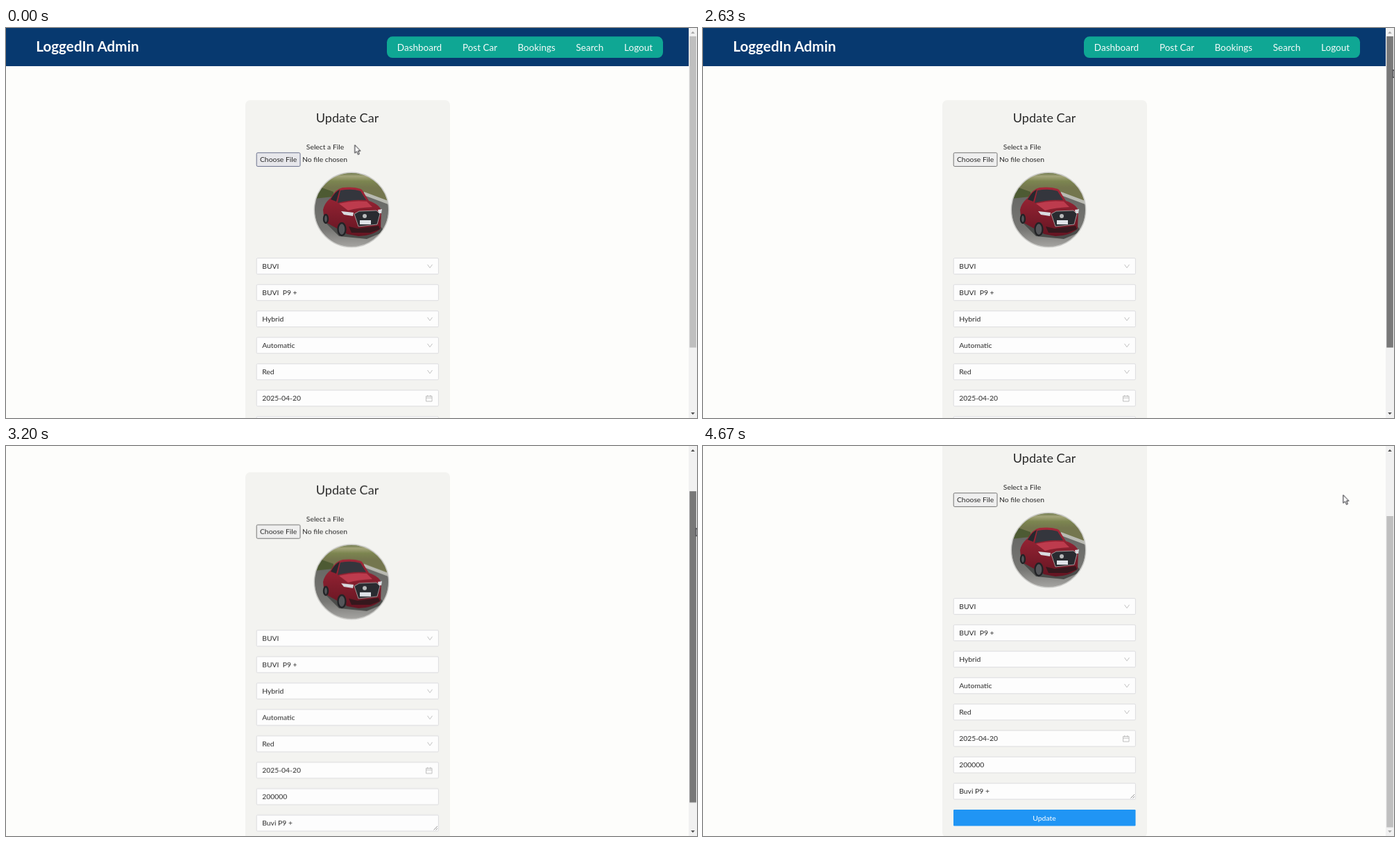
These frames come from a looping animation (996 by 562 pixels, 4700 ms). An HTML page:

```html
<!DOCTYPE html>
<html lang="en">
<head>
<meta charset="utf-8">
<title>Update Car</title>
<style>
html, body { margin: 0; width: 100%; height: 100%; overflow: hidden; background: #fdfdfb; }
svg { display: block; width: 100%; height: 100%; }
text { font: 10.37px Lato, sans-serif; fill: #2a2a2a; white-space: pre; }
.brand { font-size: 20.7px; font-weight: 700; fill: #fbfcfc; }
.nav { font-size: 13.5px; fill: #f4fbfa; text-anchor: middle; }
.mid { text-anchor: middle; }
.title { font-size: 18.1px; text-anchor: middle; }
.box { fill: #fdfdfd; stroke: #d8d8dc; stroke-width: .9; }
.icon { fill: none; stroke: #b9b9b9; stroke-width: .9; }

#page, #thumb, #cursor { animation: 4.7s linear infinite; }
#page { animation-name: scroll; }
#thumb { animation-name: drag; }
#cursor { animation-name: point; }
#grip, #pick, #up, #down { animation: 4.7s step-end infinite; }
#grip { animation-name: press; }
#pick { animation-name: blur; }
#up { animation-name: enable; }
#down { animation-name: disable; }

@keyframes scroll {
  0%, 58.09% { transform: translateY(0); }
  61.06% { transform: translateY(-4.4px); }
  65.32% { transform: translateY(-22px); }
  68.09% { transform: translateY(-66px); }
  70.85% { transform: translateY(-106px); }
  73.4%, 100% { transform: translateY(-112px); }
}
@keyframes drag {
  0%, 58.09% { transform: translateY(0); }
  61.06% { transform: translateY(3.6px); }
  65.32% { transform: translateY(17.8px); }
  68.09% { transform: translateY(53px); }
  70.85% { transform: translateY(85px); }
  73.4%, 100% { transform: translateY(89px); }
}
@keyframes point {
  0%, .6% { transform: translate(502.7px, 168.5px); animation-timing-function: ease-in-out; }
  11.28%, 24.04% { transform: translate(744.7px, 206.5px); animation-timing-function: ease-in-out; }
  34.04% { transform: translate(991px, 63px); }
  45.32%, 58.09% { transform: translate(994.7px, 60px); }
  61.06% { transform: translate(994.7px, 64px); }
  65.32% { transform: translate(994.7px, 82px); }
  68.09% { transform: translate(994.7px, 118px); }
  70.85% { transform: translate(994.7px, 153px); }
  73.4%, 80.85% { transform: translate(994.7px, 158px); animation-timing-function: ease-in-out; }
  91.49% { transform: translate(920px, 61.5px); }
  92.98%, 96.6% { transform: translate(919.5px, 61.5px); }
  99.36%, 100% { transform: translate(922.7px, 70.5px); }
}
@keyframes press {
  0% { fill: #bfbfbf; }
  32.6% { fill: #a6a6a6; }
  52.13% { fill: #787878; }
  82.34% { fill: #a6a6a6; }
  84.26% { fill: #bfbfbf; }
}
@keyframes blur {
  0% { fill: #e7e7eb; stroke: #686f8c; }
  52.13% { fill: #efefef; stroke: #747474; }
}
@keyframes enable { 0% { fill: #a8a8a8; } 58.6% { fill: #505050; } }
@keyframes disable { 0% { fill: #505050; } 73.4% { fill: #a8a8a8; } }
</style>
</head>
<body>
<svg viewBox="0 0 996 562">
  <defs>
    <clipPath id="round"><circle cx="498" cy="262" r="53.5"/></clipPath>
    <linearGradient id="land" x2="0" y2="1">
      <stop offset="0" stop-color="#59683a"/>
      <stop offset=".12" stop-color="#a3a479"/>
      <stop offset=".25" stop-color="#7c8550"/>
      <stop offset=".42" stop-color="#74764e"/>
    </linearGradient>
    <linearGradient id="road" x2="0" y2="1">
      <stop offset="0" stop-color="#666764"/>
      <stop offset=".65" stop-color="#777774"/>
      <stop offset="1" stop-color="#aaa9a6"/>
    </linearGradient>
    <linearGradient id="paint" x2="0" y2="1">
      <stop offset="0" stop-color="#a32738"/>
      <stop offset="1" stop-color="#641522"/>
    </linearGradient>
  </defs>

  <g id="page">
    <rect width="984" height="55" fill="#07396f"/>
    <text class="brand" x="43.2" y="33.6">LoggedIn Admin</text>
    <rect x="549" y="12.3" width="398" height="30.7" rx="8" fill="#0fa794"/>
    <g id="menu"></g>

    <rect x="345" y="104" width="295" height="572" rx="7" fill="#f3f3f0"/>
    <text class="title" x="492" y="136">Update Car</text>
    <text class="mid" x="460" y="174.8">Select a File</text>
    <rect id="pick" x="361.2" y="179.8" width="62.8" height="19.6" rx="1.6"/>
    <text class="mid" x="392.6" y="193.2">Choose File</text>
    <text x="427" y="193.2">No file chosen</text>

    <g clip-path="url(#round)">
      <path fill="url(#land)" d="M443 207H553V262H443Z"/>
      <path fill="#4d5a33" d="M443 226L472 236V258H443Z"/>
      <path fill="url(#road)" d="M443 246L520 238L553 254V318H443Z"/>
      <path fill="#b9bab2" d="M516 236L553 250V255L516 241Z"/>
      <path fill="#4b4c4a" d="M459 279L480 300L520 304L546 293L538 284Z"/>
      <path fill="url(#paint)" d="M457 262Q459 252 468 245Q475 232 485 230Q503 228 513 233L523 249Q538 254 541 263L540 289Q530 299 508 300L492 297L459 279Z"/>
      <path fill="#28282d" d="M468 247Q475 235 481 233L476 250Z"/>
      <path fill="#34363d" d="M482 234Q499 231 511 235L519 248Q497 247 478 252Z"/>
      <path fill="#bd3b4d" d="M480 253Q500 248 520 250L528 258Q507 259 493 263Z"/>
      <path fill="#d9dce0" d="M483 264L501 266L500 271L487 269ZM536 262L542 261L541 267L537 267Z"/>
      <path fill="#292b30" stroke="#b7b5b4" stroke-width=".8" d="M502 268L509 264L534 263L539 268L535 283L508 286Z"/>
      <path fill="#35181d" d="M494 286L507 289L537 285L539 290L525 295L498 295Z"/>
      <circle cx="517" cy="271" r="3" fill="#b9bbbc"/>
      <rect x="510" y="277" width="16" height="6" fill="#dfe2e7"/>
      <g fill="#55565a" stroke="#222326" stroke-width="2.4">
        <ellipse cx="484" cy="290" rx="5.5" ry="9"/>
        <ellipse cx="461" cy="275" rx="3" ry="6"/>
      </g>
    </g>
    <circle cx="498" cy="262" r="53.7" fill="none" stroke="#cacac7" stroke-width="1.5"/>

    <g id="fields"></g>
    <path class="icon" d="M605.5 530.5H614V538H605.5ZM605.5 533H614M607.7 529V531.5M611.8 529V531.5"/>
    <path d="M616.5 619.5L622 614M619.5 619.5L622 617" stroke="#777" stroke-width=".8"/>
    <rect x="361" y="636" width="262.5" height="23.5" rx="1.3" fill="#2095f4"/>
    <text class="mid" x="492" y="651.7" style="fill:#fff">Update</text>
  </g>

  <rect x="984" width="12" height="562" fill="#f1f1f1"/>
  <g id="thumb"><rect id="grip" x="985.3" y="12" width="9.6" height="448.5"/></g>
  <path id="up" d="M987.2 8L990 4.8L992.8 8Z"/>
  <path id="down" d="M987.2 554L990 557.2L992.8 554Z"/>
  <path id="cursor" d="M0 0V11.8L2.7 9.4L4.7 13.8L6.6 13L4.7 8.7H8.2Z" fill="#fff" stroke="#16161c" stroke-width=".95"/>
</svg>
<script>
const fill = (id, parts) => document.getElementById(id).innerHTML = parts.join('');

const menu = { Dashboard: 596, 'Post Car': 683, Bookings: 764.7, Search: 841.4, Logout: 911.6 };
fill('menu', Object.entries(menu).map(([label, x]) =>
  `<text class="nav" x="${x}" y="32.9">${label}</text>`));

const values = ['BUVI', 'BUVI  P9 +', 'Hybrid', 'Automatic', 'Red', '2025-04-20', '200000', 'Buvi P9 +'];
const selects = ['BUVI', 'Hybrid', 'Automatic', 'Red'];
fill('fields', values.map((value, i) => {
  const y = 343.2 + i * 38.05;
  const chevron = selects.includes(value)
    ? `<path class="icon" d="M607.5 ${y - 2.4}L611 ${y + 2.4}L614.5 ${y - 2.4}"/>` : '';
  return `<rect class="box" x="361.2" y="${y - 11.5}" width="262.2" height="23" rx="1.3"/>
    <text x="369.2" y="${y + 3.6}">${value}</text>${chevron}`;
}));
</script>
</body>
</html>
```
